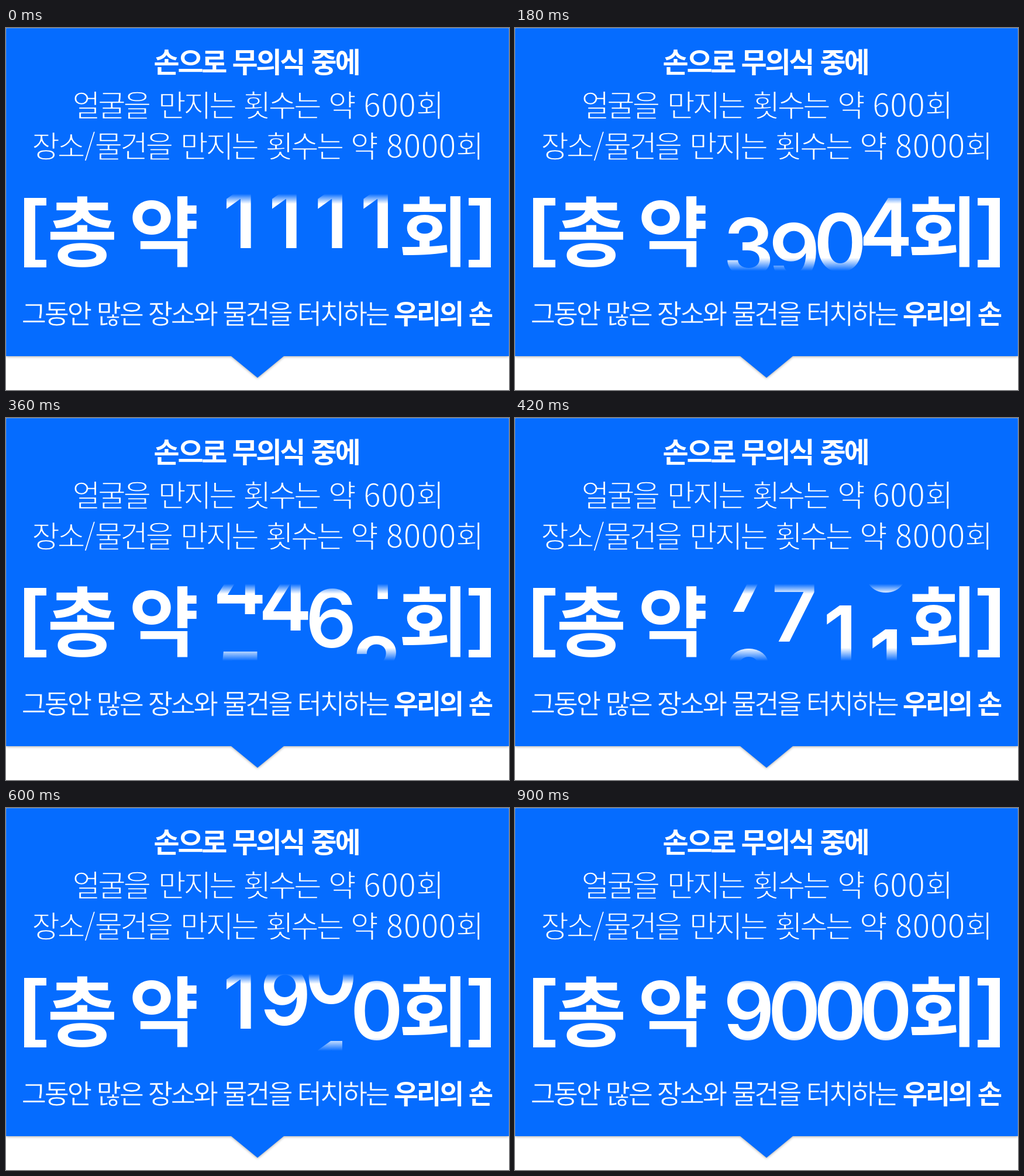
An HTML page for the animation above (1.8 s loop, 860 by 620 pixels).

```html
<!DOCTYPE html>
<html lang="ko">
<head>
<meta charset="utf-8">
<style>
  html, body { margin: 0; width: 100%; height: 100%; overflow: hidden; background: #fff; }
  svg { display: block; }
  text { fill: #fff; text-anchor: middle; font-family: "Noto Sans CJK KR", "Noto Sans CJK", sans-serif; }
  #words text { stroke: #056cff; stroke-linejoin: round; }
  #reels text { font: 600 137px Inter, "Open Sans", sans-serif; }
  #panel { fill: #056cff; filter: drop-shadow(0 1px 2px rgba(0, 0, 0, .35)); }
  #reels { filter: blur(.6px); }
</style>
</head>
<body>
<svg id="stage" width="860" height="620" viewBox="0 0 860 620">
  <defs>
    <linearGradient id="fade" gradientUnits="userSpaceOnUse" x1="0" y1="284" x2="0" y2="416">
      <stop offset="0" stop-color="#000"/>
      <stop offset=".13" stop-color="#fff"/>
      <stop offset=".83" stop-color="#fff"/>
      <stop offset="1" stop-color="#000"/>
    </linearGradient>
    <mask id="slot" maskUnits="userSpaceOnUse" x="350" y="284" width="335" height="132">
      <rect x="350" y="284" width="335" height="132" fill="url(#fade)"/>
    </mask>
  </defs>
  <path id="panel" d="M.2 .25H859.8V562H475L430 599 385 562H.2Z"/>
  <path fill="#fff" d="M31 291H69V304H50V397H69V410H31Z M829 291H791V304H810V397H791V410H829Z"/>
  <g id="words"></g>
  <g mask="url(#slot)"><g id="reels"></g></g>
</svg>
<script>
const STEP = 30, LOOP = 1800, PITCH = 164, BASE = 397;
const $ = id => document.getElementById(id);

function addText(parent, str, x, y) {
  const el = document.createElementNS('http://www.w3.org/2000/svg', 'text');
  el.textContent = str;
  el.setAttribute('x', x);
  el.setAttribute('y', y);
  parent.append(el);
  return el;
}

// Each word is centred between its left and right edge.
// A panel-coloured outline of width `thin` makes the strokes lighter.
function addLine(y, size, weight, spacing, thin, words) {
  for (const [str, left, right] of words) {
    const isNumber = /\d/.test(str), gap = isNumber ? 0 : spacing;
    const el = addText($('words'), str, (left + right + gap) / 2, y);
    Object.assign(el.style, {
      fontSize: (isNumber ? size + 2 : size) + 'px',
      fontWeight: weight,
      letterSpacing: gap + 'px',
      strokeWidth: thin
    });
  }
}

addLine(76, 48, 700, -3.2, 0, [['손으로', 254, 377], ['무의식', 388, 511], ['중에', 523, 605]]);
addLine(152.3, 52, 300, -4.3, 1.5, [['얼굴을', 116, 246], ['만지는', 262, 393], ['횟수는', 407, 538],
  ['약', 553, 597], ['600', 611, 701], ['회', 703, 747]]);
addLine(222.3, 52, 300, -4.3, 1.5, [['장소', 46, 134], ['/', 135, 152], ['물건을', 153, 285], ['만지는', 299, 432],
  ['횟수는', 445, 577], ['약', 591, 635], ['8000', 650, 769], ['회', 771, 815]]);
addLine(397, 130, 700, 0, 0, [['총', 75, 186], ['약', 215, 325], ['회', 681, 781]]);
addLine(506, 46, 400, -3.3, .5, [['그동안', 28, 146], ['많은', 157, 234], ['장소와', 245, 361],
  ['물건을', 372, 489], ['터치하는', 500, 655]]);
addLine(506, 46, 700, -3.3, 0, [['우리의', 665, 781], ['손', 792, 832]]);

// Reel positions in digits at the key times; the last key is the stop.
const KEYS = [0, 90, 240, 360, 510, 720];
const reels = [
  { x: 399.7, end: 900, pos: [1.12, -1.11, -12.63, -25.63, -42.07, -55.61, -61] },
  { x: 477.7, end: 870, pos: [1.12, -2.3, -18.945, -35.8, -52.4, -70.66, -80] },
  { x: 555.9, end: 630, pos: [1.12, -3.55, -14.85, -23.975, -35.87, -40] },
  { x: 634, end: 510, pos: [1.12, -1.16, -9.93, -18.47, -20] }
];
for (const r of reels) {
  r.time = [...KEYS.slice(0, r.pos.length - 1), r.end];
  r.digits = [0, 1].map(() => addText($('reels'), '', r.x, BASE));
}

// Monotone cubic curve through the keys, at rest on both ends.
function position({ time, pos }, t) {
  const last = pos.length - 1;
  if (t >= time[last]) return pos[last];
  const i = time.findIndex(v => v > t) - 1;
  const slope = k => (pos[k + 1] - pos[k]) / (time[k + 1] - time[k]);
  const tangent = k => {
    if (k === 0 || k === last) return 0;
    const a = slope(k - 1), b = slope(k);
    return 2 * a * b / (a + b);
  };
  const h = time[i + 1] - time[i], u = (t - time[i]) / h, v = 1 - u;
  return pos[i] * (1 + 2 * u) * v * v + pos[i + 1] * (3 - 2 * u) * u * u
    + h * u * v * (tangent(i) * v - tangent(i + 1) * u);
}

function draw(t) {
  for (const r of reels) {
    const p = position(r, t), n = Math.floor(p);
    r.digits.forEach((el, k) => {
      el.textContent = ((n + k) % 10 + 10) % 10;
      el.setAttribute('y', BASE + (n + k - p) * PITCH);
    });
  }
}

const start = performance.now();
function tick(now) {
  const t = Math.max(0, now - start) % LOOP;
  draw(Math.floor(t / STEP) * STEP);
  requestAnimationFrame(tick);
}
draw(0);
requestAnimationFrame(tick);
</script>
</body>
</html>
```
